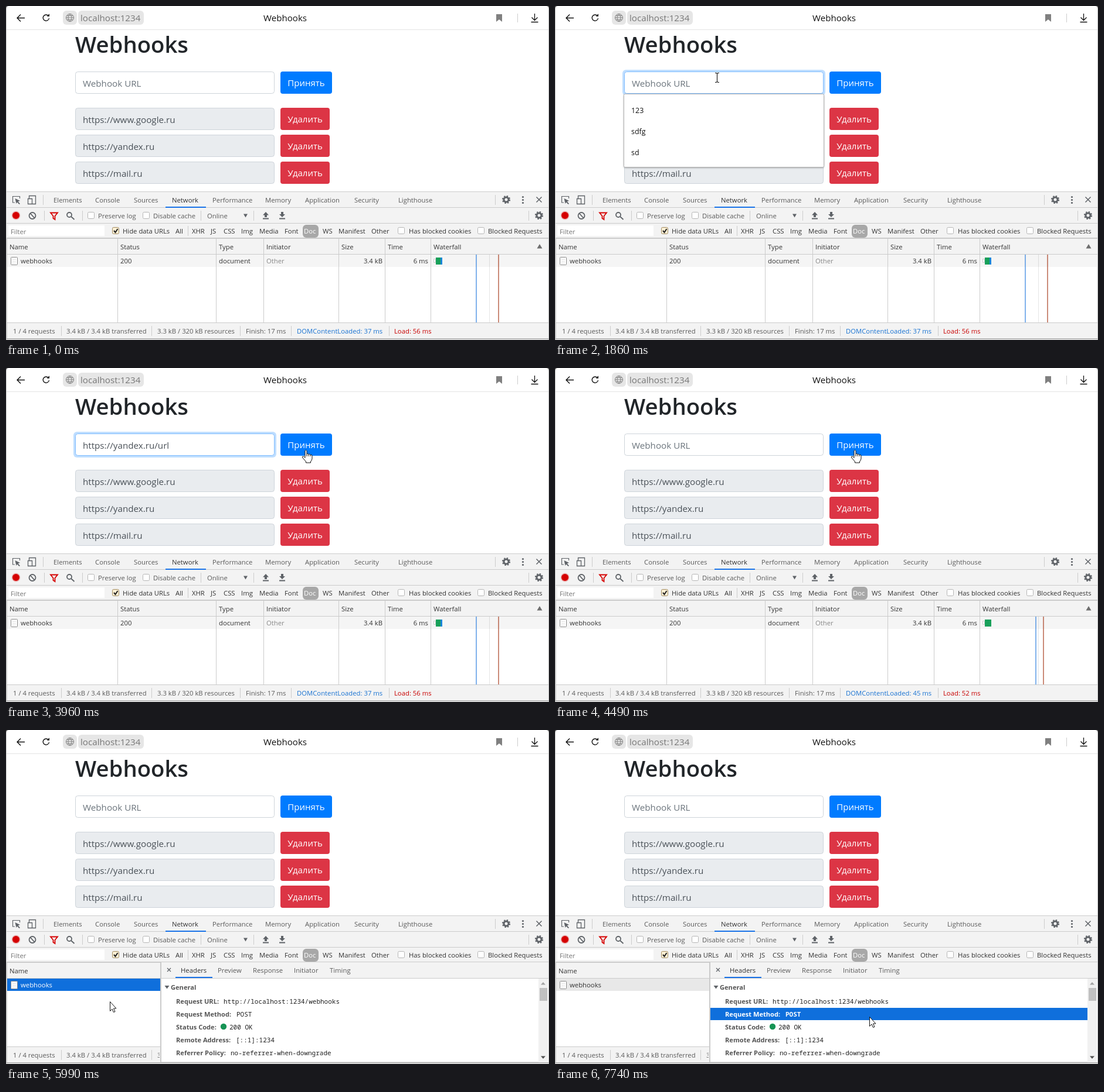
An HTML page with a canvas for the animation above (8000 ms loop, 926 px wide and 571 px high).

```html
<!DOCTYPE html>
<html lang="ru">
<head>
<meta charset="utf-8">
<title>Webhooks</title>
<style>
html, body { margin: 0; width: 100%; height: 100%; overflow: hidden; background: #fff; }
canvas { display: block; }
</style>
</head>
<body>
<canvas id="stage" width="926" height="571"></canvas>
<script>
const g = document.getElementById('stage').getContext('2d');
const LOOP = 8000, STEP = 66;
const SANS = '"Open Sans", "Noto Sans", sans-serif';
const MONO = '11px "Noto Sans Mono", "DejaVu Sans Mono", monospace';
const UI = '11.3px ' + SANS, FORM = '15.2px ' + SANS, KEY = '700 11.1px ' + SANS;
const GRAY = '#5f6368', LINE = '#cbcbcb', PANEL = '#f3f3f3', BLUE = '#0f6fdc';

// Cursor moves: start, end, first point, control point, last point
const moves = [
  [730, 1190, [452, 518], [385, 210], [276, 122]],
  [3290, 3690, [297, 130], [410, 136], [510, 140]],
  [4490, 5090, [510, 140], [290, 280], [108, 433]],
  [5790, 6530, [112, 436], [290, 526], [460, 464]],
  [6730, 7270, [461, 466], [495, 492], [536, 490]],
];
const clicks = [[1390, 1530], [3750, 3890], [5150, 5310], [6600, 6730], [7410, 7670]];
const within = (t, a, b) => t >= a && t < b;

function rect(x, y, w, h, color) {
  g.fillStyle = color;
  g.fillRect(x, y, w, h);
}
function box(x, y, w, h, r, fill, stroke) {
  g.beginPath();
  g.roundRect(x, y, w, h, r);
  if (fill) { g.fillStyle = fill; g.fill(); }
  if (stroke) { g.strokeStyle = stroke; g.lineWidth = 1; g.stroke(); }
}
function text(s, x, y, color = '#333', font = UI, align = 'left') {
  g.font = font;
  g.fillStyle = color;
  g.textAlign = align;
  g.fillText(s, x, y);
}
function disc(x, y, r, color) {
  g.beginPath();
  g.arc(x, y, r, 0, 7);
  g.fillStyle = color;
  g.fill();
}
function stroke(d, color = GRAY, width = 1.5) {
  g.strokeStyle = color;
  g.lineWidth = width;
  g.stroke(new Path2D(d));
}
function fill(d, color = GRAY) {
  g.fillStyle = color;
  g.fill(new Path2D(d));
}
const divider = (x, y, h = 17) => rect(x, y, 1, h, '#ccc');

function browserBar(t) {
  rect(1, 0, 924, 40, '#fff');
  rect(1, 40, 924, 1, '#e3e3e3');
  stroke('M32 20.5H19M25 14.5L19 20.5L25 26.5', '#111', 1.4);
  stroke('M72.5 17A5.2 5.2 0 1 0 73.5 21', '#111', 1.4);
  fill('M69.5 17.7H74V13.2Z', '#111');
  box(97, 8, 24, 24, 6, '#e6e6e6');
  box(123, 8, 112, 24, 6, '#e6e6e6');
  stroke('M102.5 20a6.5 6.5 0 1 0 13 0a6.5 6.5 0 1 0-13 0H115.5M109 13.5c-4 4-4 9 0 13c4-4 4-9 0-13M104 16.5H114M104 23.5H114', '#808080', 1);
  text('localhost:1234', 127, 26, '#777', FORM);
  text('Webhooks', 476, 26, '#111', '15.1px ' + SANS, 'center');
  fill('M836 14H846V27L841 23L836 27Z', '#808080');
  divider(872, 13, 15);
  stroke('M901.5 13V24M896.5 19.5L901.5 24.5L906.5 19.5M895.5 27.5H907.5', '#111', 1.3);
  if (within(t, 4090, 4300)) rect(1, 40, t < 4160 ? 225 : 924, 3, '#fc0');
}

function button(label, y, w, color) {
  box(468, y, w, 38, 4, color);
  text(label, 468 + w / 2, y + 25, '#fff', '500 15px ' + SANS, 'center');
}

function page(t) {
  text('Webhooks', 118, 80, '#212529', '600 38.3px ' + SANS);
  const focus = t < 4020 ? Math.min(1, Math.max(0, (t - 1320) / 150)) : 0;
  if (focus) {
    g.globalAlpha = focus;
    box(115, 109, 346, 44, 6, '#bfdeff');
    g.globalAlpha = 1;
  }
  box(118.5, 112.5, 339, 37, 4, '#fff', focus ? '#80bdff' : '#ced4da');
  const typed = within(t, 2760, 4020) ? 'https://yandex.ru/url' : '';
  text(typed || 'Webhook URL', 131, 138, typed ? '#495057' : '#6c757d', FORM);
  if (within(t, 1390, 1860) || within(t, 2350, 3290)) {
    rect(131 + Math.round(g.measureText(typed).width), 121, 1, 21, '#495057');
  }
  button('Принять', 112, 88, '#007bff');
  ['https://www.google.ru', 'https://yandex.ru', 'https://mail.ru'].forEach((url, i) => {
    const y = 174 + i * 46;
    box(118.5, y + .5, 339, 37, 4, '#e9ecef', '#ced4da');
    text(url, 131, y + 26, '#495057', FORM);
    button('Удалить', y, 84, '#dc3545');
  });
  if (within(t, 1460, 2830)) {
    g.save();
    g.shadowColor = 'rgba(0,0,0,.4)';
    g.shadowBlur = 3;
    g.shadowOffsetY = 1;
    box(117.5, 150.5, 341, 125, 2, '#fff');
    g.restore();
    box(117.5, 150.5, 341, 125, 2, null, '#b5b5b5');
    ['123', 'sdfg', 'sd'].forEach((s, i) => text(s, 130, 183 + i * 36, '#111', '12.4px ' + SANS));
  }
}

function gear(x, y) {
  g.strokeStyle = GRAY;
  g.lineWidth = 3;
  g.beginPath();
  g.arc(x, y, 4, 0, 2 * Math.PI);
  g.stroke();
  g.setLineDash([2.4, 2.4]);
  g.lineWidth = 2;
  g.beginPath();
  g.arc(x, y, 6.1, 0, 2 * Math.PI);
  g.stroke();
  g.setLineDash([]);
}
function checkbox(x, y, on) {
  box(x - 5.5, y - 5.5, 11, 11, 2, on ? '#fdf0d5' : '#fff', on ? '#a08b60' : '#b5b5b5');
  if (on) stroke(`M${x - 3} ${y}l2.5 3l4-6`, '#222', 2);
}
function labels(list, y, color) {
  list.forEach(([s, x, c]) => text(s, x, y, c || color));
}

function toolbars() {
  rect(1, 317, 924, 253, PANEL);
  for (const y of [317, 344, 371, 396]) rect(1, y, 924, 1, LINE);

  stroke('M15 336H11.5V325.5H23.5V329', GRAY, 1.2);
  fill('M15.5 329L24 333L20.5 334.2L24 338L22.5 339L19 335.5L17.5 338Z');
  stroke('M39.5 329V324.5H50.5V338.5H45M37.5 329.5H44.5V338.5H37.5Z', GRAY, 1.3);
  divider(63, 323);
  labels([['Elements', 81], ['Console', 152], ['Sources', 218], ['Network', 283, '#333'],
    ['Performance', 352], ['Memory', 442], ['Application', 510], ['Security', 594],
    ['Lighthouse', 669]], 336, '#5a5a5a');
  rect(272, 343, 69, 2, '#1a73e8');
  divider(834, 323);
  gear(853, 331);
  for (const dy of [-5, 0, 5]) disc(881.5, 331.5 + dy, 1.6, GRAY);
  stroke('M904.5 326.5L913.5 335.5M913.5 326.5L904.5 335.5');

  disc(17, 358, 7.5, 'rgba(213,0,0,.25)');
  disc(17, 358, 6, '#d50000');
  stroke('M39.5 358.5a5.5 5.5 0 1 0 11 0a5.5 5.5 0 1 0-11 0M41.5 354.5L48.5 362.5', GRAY, 1.8);
  divider(65, 350);
  stroke('M76 353.5H88L83.5 359V365L80.5 363V359Z', '#d50000', 1.8);
  stroke('M104 357a4 4 0 1 0 8 0a4 4 0 1 0-8 0M111 360L116.5 365', GRAY, 1.8);
  divider(130, 350);
  checkbox(145, 358);
  checkbox(239, 358);
  labels([['Preserve log', 157], ['Disable cache', 251], ['Online', 343]], 363, '#5a5a5a');
  divider(332, 350);
  fill('M405 355.5H412L408.5 361.5Z');
  divider(422, 350);
  fill('M443 352L448 357.5H445V361H441V357.5H438ZM438 362.5H448V364.5H438Z');
  fill('M471 361L466 356H469V352H473V356H476ZM466 362.5H476V364.5H466Z');
  divider(891, 350);
  gear(909, 358);

  rect(4, 375, 164, 18, '#fff');
  text('Filter', 8, 390, '#757575');
  checkbox(187, 384, true);
  divider(310, 376);
  box(506, 374, 27, 22, 6, '#a8a8a8');
  labels([['Hide data URLs', 199], ['All', 289], ['XHR', 317], ['JS', 349], ['CSS', 371],
    ['Img', 401], ['Media', 432], ['Font', 475], ['Doc', 508, '#fff'], ['WS', 540],
    ['Manifest', 567], ['Other', 623], ['Has blocked cookies', 687],
    ['Blocked Requests', 822]], 389, '#333');
  checkbox(674, 384);
  checkbox(810, 384);
}

function fileIcon() {
  box(8.5, 429.5, 11, 13, 1, '#fff', '#8a8a8a');
  stroke('M11 433.5H17M11 436.5H17M11 439.5H17', '#e2e2e2', 1);
}

function statusBar(reloaded) {
  rect(1, 541, 924, 1, LINE);
  rect(1, 542, 924, 26, PANEL);
  for (const x of [94, 248, 399, 486, 653]) divider(x, 547);
  labels([['1 / 4 requests', 12], ['3.4 kB / 3.4 kB transferred', 103],
    ['3.3 kB / 320 kB resources', 258], ['Finish: 17 ms', 409],
    [`DOMContentLoaded: ${reloaded ? 45 : 37} ms`, 496, '#1a73d2'],
    [`Load: ${reloaded ? 52 : 56} ms`, 662, '#c80000']], 560, '#5a5a5a');
}

function table(t) {
  const reloaded = t >= 4020, picked = t >= 5150;
  const ink = picked ? '#fff' : '#333';
  rect(2, 425, 922, 116, '#fff');
  rect(2, 425, 922, 21, picked ? BLUE : '#f5f5f5');
  rect(1, 397, 924, 1, LINE);
  rect(1, 424, 924, 1, LINE);
  rect(824, 425, 1, 116, 'rgba(0,0,0,.1)');
  for (const x of [190, 358, 439, 567, 646, 724]) rect(x, 398, 1, 143, LINE);
  labels([['Name', 6], ['Status', 195], ['Type', 363], ['Initiator', 444], ['Size', 572],
    ['Time', 651], ['Waterfall', 729]], 416, '#333');
  fill('M905.5 414.5H914.5L910 407Z', '#6e6e6e');
  fileIcon();
  labels([['webhooks', 25], ['200', 195], ['document', 363],
    ['Other', 444, picked ? '#fff' : '#888']], 440, ink);
  text('3.4 kB', 642, 440, ink, UI, 'right');
  text('6 ms', 720, 440, ink, UI, 'right');
  box(729.5, 432.5, 3, 6, 0, '#fff', '#ccc');
  rect(733, 430, 11, 12, '#18a05a');
  if (!reloaded) rect(741, 430, 3, 12, '#1a86d8');
  rect(reloaded ? 819 : 801, 425, 2, 116, 'rgba(26,115,220,.55)');
  rect(reloaded ? 832 : 839, 425, 2, 116, 'rgba(165,55,25,.58)');
  statusBar(reloaded);
  if (within(t, 5220, 5310)) {
    g.globalAlpha = .2;
    box(118.5, 454.5, 185, 24, 1, '#fff', '#777');
    text('http://localhost:1234/webhooks', 127, 471, '#333');
    g.globalAlpha = 1;
  }
}

function details(t) {
  statusBar(true);
  rect(2, 425, 261, 116, '#fff');
  const active = t < 6600;
  rect(2, 425, 261, 21, active ? BLUE : '#e8e8e8');
  rect(1, 397, 263, 1, LINE);
  rect(1, 424, 924, 1, LINE);
  text('Name', 6, 416);
  fileIcon();
  text('webhooks', 25, 440, active ? '#fff' : '#333');

  rect(262, 542, 3, 26, PANEL);
  rect(265, 397, 660, 27, PANEL);
  rect(265, 425, 660, 143, '#fff');
  rect(263, 397, 2, 171, LINE);
  stroke('M275 407L281 413M281 407L275 413', GRAY, 1.3);
  labels([['Headers', 298, '#333'], ['Preview', 361], ['Response', 421],
    ['Initiator', 491], ['Timing', 552]], 415, '#5a5a5a');
  rect(289, 422, 63, 2, '#1a73e8');
  fill('M270.5 437H278.5L274.5 442.5Z');
  text('General', 281, 444, '#555', KEY);

  const selected = t < 6600 ? -1 : t < 7470 ? 0 : 1;
  [['Request URL:', 'http://localhost:1234/webhooks', 371],
    ['Request Method:', 'POST', 393],
    ['Status Code:', '200 OK', 381],
    ['Remote Address:', '[::1]:1234', 392],
    ['Referrer Policy:', 'no-referrer-when-downgrade', 383]].forEach(([key, value, x], i) => {
    const y = 453 + i * 22, on = i === selected;
    if (on) rect(265, y, 643, 21, BLUE);
    text(key, 290, y + 15, on ? '#fff' : '#555', KEY);
    text(value, x, y + 15, on ? '#fff' : '#222', on ? '600 ' + MONO : MONO);
  });
  disc(371, 507, 5.2, '#179455');
  rect(265, 567, 643, 1, '#ddd');

  rect(908, 425, 16, 143, '#f1f1f1');
  rect(910, 441, 13, 22, '#c1c1c1');
  fill('M912 435.5H920L916 431Z', '#a3a3a3');
  fill('M912 557.5H920L916 562Z', '#505050');
}

function pointerAt(t) {
  let pos = null;
  for (const [start, end, a, c, b] of moves) {
    if (t < start) break;
    const p = Math.min(1, Math.floor((t - start) / STEP) * STEP / (Math.floor((end - start) / STEP) * STEP));
    const e = p * p * (3 - 2 * p), q = 1 - e;
    pos = [0, 1].map(i => Math.round(q * q * a[i] + 2 * q * e * c[i] + e * e * b[i]));
  }
  return pos;
}

function pointerKind(x, y) {
  const row = (y - 174) % 46;
  const inRow = within(y, 112, 150) || within(y, 174, 304) && row < 38;
  if (inRow && within(x, 118, 458)) return 'beam';
  if (inRow && within(x, 468, 554)) return 'hand';
  return within(y, 425, 446) && x < 190 ? 'hand' : 'arrow';
}

function pointer(t) {
  const pos = pointerAt(t);
  if (!pos) return;
  const [x, y] = pos;
  if (clicks.some(([a, b]) => within(t, a, b))) disc(x, y, 12, 'rgba(225,160,75,.6)');
  g.save();
  g.translate(x, y);
  const kind = pointerKind(x, y);
  if (kind === 'beam') {
    stroke('M-3 -7.5H-1L.5 -6.5L2 -7.5H4M.5 -7V8M-3 8.5H-1L.5 7.5L2 8.5H4', '#111', 1.1);
  } else {
    const d = kind === 'arrow'
      ? 'M.5 .5V16.5L4 13L6.5 18.5L9 17.5L6.5 12H11Z'
      : 'M0 1.5Q1.5 -1 3 1.5V7Q5 5.5 6 7.5Q8 6.5 9 8.5Q11.5 7.5 12 10V15Q11.5 18 9.5 20V22H1.5V20L-4.5 13Q-5 10.5-2.5 11L0 13.5Z';
    fill(d, '#fff');
    stroke(d, '#111', 1);
    if (kind === 'hand') stroke('M3 7V11M6 7.5V11M9 8.5V11', '#111', 1);
  }
  g.restore();
}

function frame(now) {
  const t = now % LOOP;
  rect(0, 0, 926, 571, '#fff');
  browserBar(t);
  page(t);
  toolbars();
  if (t < 5310) table(t); else details(t);

  // Window edges
  rect(0, 0, 1, 571, '#c4c4c4');
  rect(1, 397, 1, 172, LINE);
  rect(925, 0, 1, 571, '#c4c4c4');
  rect(1, 568, 924, 1, LINE);
  rect(0, 569, 926, 1, '#a0a0a0');
  fill('M0 0H5Q0 0 0 5Z', '#444');
  fill('M926 0H921Q926 0 926 5Z', '#444');

  pointer(t);
  requestAnimationFrame(frame);
}
requestAnimationFrame(frame);
</script>
</body>
</html>
```
